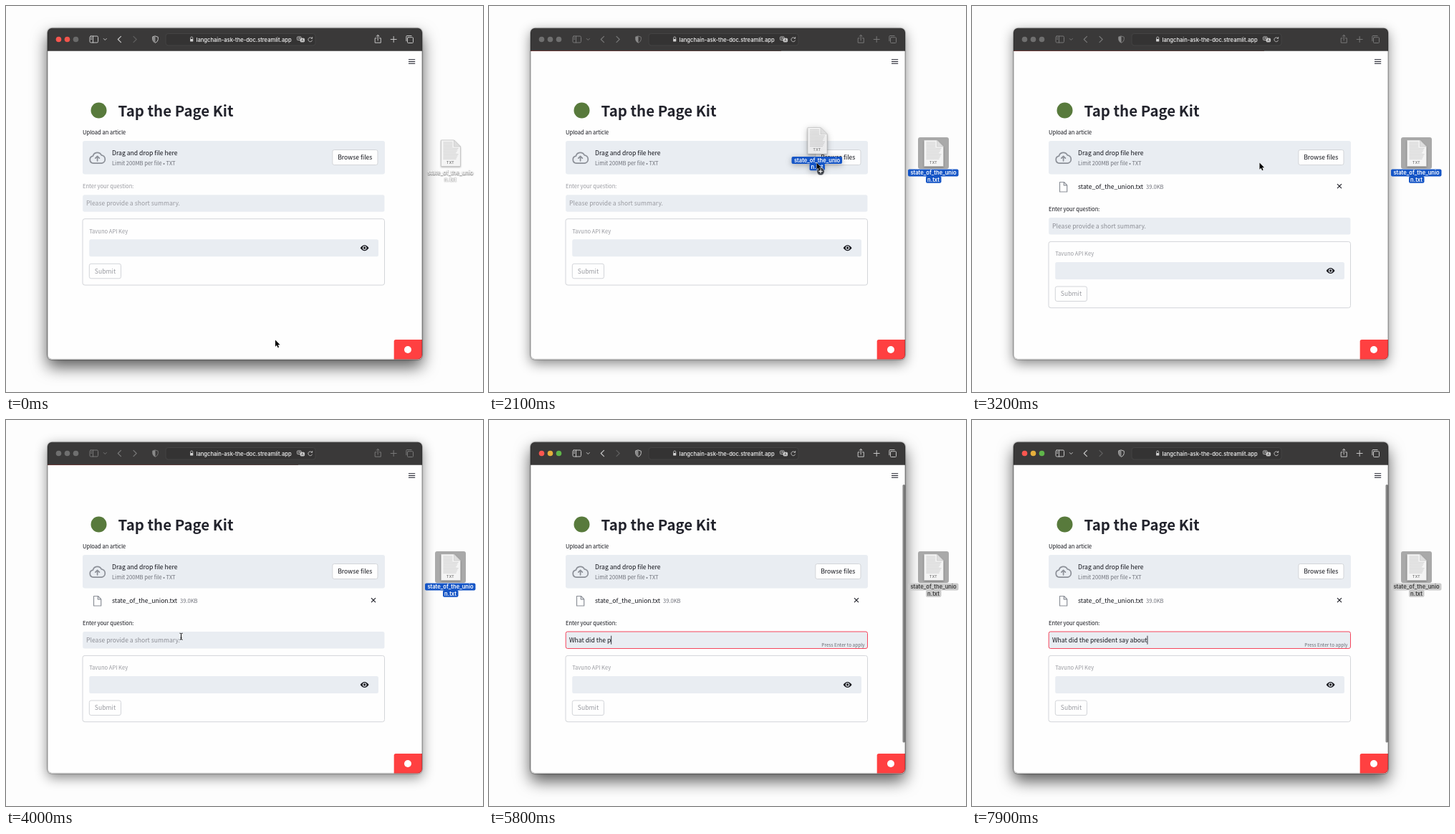
Recreate the animation shown at these times as an HTML page. Size 666 px wide and 538 px high, loop 8000 ms.

```html
<!DOCTYPE html>
<html lang="en">
<head>
<meta charset="utf-8">
<title>Document questions</title>
<style>
html, body { margin: 0; width: 100%; height: 100%; overflow: hidden; background: #fdfdfd; }
#win { position: absolute; left: 58px; top: 31px; width: 523px; height: 461.5px; border-radius: 6px;
  box-shadow: 0 5px 17px rgba(0,0,0,.48), 0 0 1.5px rgba(0,0,0,.8); }
.active #win { box-shadow: 0 10px 22px rgba(0,0,0,.66), 0 0 2px rgba(0,0,0,.8); }
svg { position: absolute; left: 0; top: 0; width: 666px; height: 538px; }
text { font: 8.65px "Noto Sans CJK JP", "Noto Sans CJK SC", "Noto Sans CJK", "Open Sans", sans-serif; fill: #12131a; white-space: pre; }
.small { font-size: 7.57px; }
.tiny { font-size: 6.5px; fill: #686a72; text-anchor: end; }
.soft { fill: #6f717a; }
.pale { fill: #999aa0; }
.title { font-size: 20.4px; font-weight: 700; fill: #22232c; }
.field { fill: #e9edf2; }
.edge { fill: #fefefe; stroke: #d3d5d9; }
.url { font: 500 7.6px Inter, "Liberation Sans", sans-serif; fill: #f4f4f4; }
.icons { fill: none; stroke: #777; stroke-linecap: round; stroke-linejoin: round; }
.active .icons { stroke: #c4c4c4; }
.active .next { stroke: #5f5f5f; }
.line { fill: none; stroke: #8c9098; stroke-width: 1.2; stroke-linejoin: round; stroke-linecap: round; }
.cloud { stroke-width: 1.7; }
.active #strip { display: none; }
.name text { font: 600 7.6px Inter, "Liberation Sans", sans-serif; text-anchor: middle; fill: #fff; }
.name rect { fill: #1555c6; }
.plain rect { fill: none; }
.plain text { text-shadow: 0 .5px 1.5px rgba(0,0,0,.75); }
.dim rect { fill: #cbcbcb; }
.dim text { fill: #3c3c3c; }
#ghost { filter: drop-shadow(0 2px 4px rgba(0,0,0,.3)); }
.focus #ask { stroke: #f5455c; }
.ready #prompt { fill: #12131a; }
.ready #hint { fill: #8b8d94; }
</style>
</head>
<body>
<div id="win"></div>
<svg viewBox="0 0 666 538">
  <defs>
    <g id="doc">
      <path d="M-13-18H5L14-9V18.500H-13Z" fill="#f4f4f4" stroke="#bdbdbd" stroke-width=".7" style="filter:drop-shadow(0 1px 1px rgba(0,0,0,.3))"/>
      <path id="lines" stroke="#c4c4c4" stroke-width=".8"/>
      <path d="M5-18V-9H14Z" fill="#dedede" stroke="#bdbdbd" stroke-width=".5"/>
      <text y="14.500" text-anchor="middle" style="font:500 5px Inter,sans-serif;letter-spacing:.4px;fill:#666">TXT</text>
    </g>
    <g id="label">
      <rect x="-35.500" y="22.500" width="70.500" height="10" rx="2"/>
      <rect x="-10.500" y="32" width="21.500" height="9.700" rx="2"/>
      <text y="30.200">state_of_the_unio</text>
      <text y="39.500">n.txt</text>
    </g>
    <linearGradient id="warm"><stop stop-color="#6a2421"/><stop offset="1" stop-color="#432f2c"/></linearGradient>
  </defs>

  <!-- window -->
  <rect x="58" y="31" width="523" height="461.500" rx="6" fill="#fefefe"/>
  <path d="M58 62.700V37a6 6 0 0 1 6-6H575a6 6 0 0 1 6 6V62.700Z" fill="#3a3939"/>
  <path d="M64 31.400H575" stroke="#5b5b5b" stroke-width=".8"/>
  <rect id="strip" x="58" y="62" width="350" height=".7" fill="url(#warm)"/>
  <g id="lights"><circle cx="73.500" cy="46.500" r="3.800"/><circle cx="85.500" cy="46.500" r="3.800"/><circle cx="97.500" cy="46.500" r="3.800"/></g>
  <rect x="223" y="38.500" width="209" height="16.500" rx="3.500" fill="#343333" stroke="#484848" stroke-width=".8"/>
  <g class="icons">
    <path d="M118.500 42h8.500a1.500 1.500 0 0 1 1.500 1.500v6a1.500 1.500 0 0 1-1.500 1.500h-8.500a1.500 1.500 0 0 1-1.500-1.500v-6a1.500 1.500 0 0 1 1.500-1.500ZM121.500 42v9M118.600 44.300h1.200M118.600 46.300h1.200"/>
    <path d="M136.300 45.500l2 2 2-2"/>
    <path d="M160.500 42.300l-4.200 4.200 4.200 4.200" stroke-width="1.200"/>
    <path class="next" d="M178 42.300l4.200 4.200-4.200 4.200" stroke-width="1.200"/>
    <path d="M208.500 42l3.800 1.300v3.200q0 3-3.800 4.900q-3.800-1.900-3.800-4.900v-3.200Z"/>
    <path d="M208.500 42v9.400q-3.800-1.900-3.800-4.900v-3.200Z" fill="#8a8a8a" stroke="none"/>
    <path d="M517 44.800h-1.800v6.400h8.100v-6.400h-1.800M519.200 48v-7.500M517.200 42.300l2-2 2 2"/>
    <path d="M541.200 42.500v8M537.200 46.500h8"/>
    <path d="M561.500 43.700h6a1 1 0 0 1 1 1v5.800a1 1 0 0 1-1 1h-6a1 1 0 0 1-1-1v-5.800a1 1 0 0 1 1-1ZM558.900 48.700v-6.200a1 1 0 0 1 1-1h6.200"/>
  </g>
  <g fill="none" stroke="#d2d2d2" stroke-width=".8">
    <path d="M257.600 46v-1.400a1.600 1.600 0 0 1 3.200 0v1.400"/>
    <rect x="257.100" y="46" width="4.200" height="3.600" fill="#d2d2d2" stroke="none" rx=".6"/>
    <rect x="406.500" y="42.800" width="5.600" height="4.800" rx="1"/>
    <rect x="411" y="45.200" width="5.600" height="4.800" rx="1" fill="#d2d2d2"/>
    <path d="M408 44.600h2.600M409.300 44v.6M408.100 46.600l2-2"/>
    <path d="M412.500 49.200l1.300-2.800 1.300 2.800" stroke="#343333" stroke-width=".7"/>
    <path d="M427.400 45.500a2.900 2.900 0 1 0 .2 2.100M425.700 45.200h2v-2.200"/>
  </g>
  <text class="url" x="265.500" y="49.500">langchain-ask-the-doc.streamlit.app</text>

  <!-- page -->
  <path d="M562 74.500h9.200M562 77.300h9.200M562 80.100h9.200" stroke="#3a3b45" stroke-width="1.200"/>
  <circle cx="129.500" cy="145.500" r="11" fill="#587a3c"/>
  <text class="title" x="156.500" y="153.700">Tap the Page Kit</text>
  <text class="small" x="107" y="178.500">Upload an article</text>
  <rect class="field" x="107" y="188" width="422" height="46.500" rx="3"/>
  <path class="line cloud" d="M122 219.200a5.100 5.100 0 0 1-.6-10.100a6.300 6.300 0 0 1 11.800-1.200a5.700 5.700 0 0 1 .3 11.300ZM127.600 215.800v-6M124.800 212.200l2.800-2.800 2.800 2.800"/>
  <text x="148" y="208">Drag and drop file here</text>
  <text class="small soft" x="148" y="222.300">Limit 200MB per file • TXT</text>
  <rect class="edge" x="455.800" y="200.500" width="63.200" height="21" rx="2.500"/>
  <text x="487.300" y="214.300" text-anchor="middle">Browse files</text>

  <g id="upload">
    <path class="line" d="M122.500 245.500h6l4.200 4.200v9.300h-10.200ZM128.300 245.700v4.200h4.200"/>
    <text x="148" y="255">state_of_the_union.txt</text>
    <text class="small soft" x="243" y="255">39.0KB</text>
    <path d="M510 248.200l6 6M516 248.200l-6 6" stroke="#22232c" stroke-width="1.200"/>
  </g>

  <g id="low">
    <text id="prompt" class="small pale" x="107" y="254.200">Enter your question:</text>
    <rect id="ask" class="field" x="107.200" y="263.300" width="421.300" height="23.500" rx="2.500"/>
    <text id="hint" class="pale" x="112" y="278.400">Please provide a short summary.</text>
    <text id="typed" x="112" y="278.400"></text>
    <rect id="caret" y="269" width=".9" height="12" fill="#22232c"/>
    <text id="apply" class="tiny" x="524.500" y="284.200">Press Enter to apply</text>
    <rect class="edge" x="107" y="296.700" width="421.500" height="92.300" rx="3"/>
    <text class="small pale" x="116.200" y="316.500">Tavuno API Key</text>
    <rect class="field" x="116.200" y="325.200" width="403.800" height="24" rx="2.500"/>
    <path d="M494.600 337.200q6-8 12 0q-6 8-12 0Z" fill="#17181f"/>
    <circle cx="500.600" cy="337.200" r="2.200" fill="#17181f" stroke="#e9edf2" stroke-width="1.100"/>
    <rect class="edge" x="116.300" y="359.300" width="44.200" height="20.500" rx="2.500"/>
    <text class="pale" x="138.500" y="372.700" text-anchor="middle">Submit</text>
  </g>
  <rect id="scroll" x="577.500" y="90" width="3.500" height="359.500" rx="1.500" fill="#858585"/>
  <path d="M541.700 492.500V467.500a2.500 2.500 0 0 1 2.500-2.500H581V486.500a6 6 0 0 1-6 6Z" fill="#ff4041"/>
  <circle cx="561" cy="479" r="5" fill="#fff"/>
  <rect x="58.200" y="31.200" width="522.600" height="461.100" rx="6" fill="none" stroke="#000" stroke-opacity=".4" stroke-width=".7"/>

  <!-- desktop file, dragged copy, pointer -->
  <g transform="translate(620.500 205)">
    <rect id="picked" x="-21.500" y="-22" width="43" height="44" rx="3" fill="#a9a9a9"/>
    <use href="#doc"/>
    <g id="name" class="name"></g>
  </g>
  <g id="ghost">
    <use href="#doc" opacity=".85"/>
    <g class="name" id="ghostName"></g>
  </g>
  <g id="pointer">
    <g id="badge"><circle cx="5.500" cy="12" r="5.200" fill="#3d4148" stroke="#d8dbe0" stroke-width=".6"/><path d="M2.800 12h5.400M5.500 9.300v5.400" stroke="#fff" stroke-width="1.200"/></g>
    <path id="arrow" d="M0 0V9.200L2.100 7.200L3.600 10.700L5.100 10L3.600 6.700H6.600Z" stroke="#fff" stroke-width=".7" paint-order="stroke"/>
    <path id="beam" d="M-2-4.500q2 0 2 1.200q0-1.200 2-1.200M0-3.300v6.600M-2 4.500q2 0 2-1.200q0 1.200 2 1.200M-1 1.500h2" fill="none" stroke="#111"/>
  </g>
</svg>
<script>
const $ = id => document.getElementById(id);
const LOOP = 8000, GRAB = 1000, DRAG = 1300, DROP = 2750, ADDED = 2900, CLICK = 4200;
const QUESTION = "What did the president say about";

$("lines").setAttribute("d", Array.from({length: 12}, (_, i) =>
  `M-10 ${-15 + i * 2.1}h${i < 4 ? 13 : 21 - i * 5 % 4}`).join(""));
// cloned so that each label takes the colours of its own group
for (const id of ["name", "ghostName"]) {
  const copy = $("label").cloneNode(true);
  copy.removeAttribute("id");
  $(id).append(copy);
}

const ease = (t, a, b) => {
  const u = Math.min(1, Math.max(0, (t - a) / (b - a)));
  return u * u * (3 - 2 * u);
};
const show = (id, on) => $(id).style.display = on ? "" : "none";
const move = (id, x, y) => $(id).setAttribute("transform", `translate(${x} ${y})`);

// [start, end, x, y]: each leg leads to the next resting place
const legs = [[150, 950, 618.5, 218.5], [DRAG, 2500, 401.5, 218.5], [3400, 4100, 235.5, 306.5]];
function pointerAt(t) {
  let x = 376, y = 465.5;
  for (const [a, b, X, Y] of legs) {
    const u = ease(t, a, b);
    x += (X - x) * u;
    y += (Y - y) * u;
  }
  return [x, y];
}

function typedCount(t) {
  return t < 6000 ? Math.max(0, Math.min(15, Math.round((t - 4800) * .014)))
                  : 15 + Math.round((t - 6000) / 1900 * 17);
}

function lightColors(t, active) {
  if (!active) return ["#6f6f6f", "#6f6f6f", "#6f6f6f"];
  if (t < GRAB) return ["#f9564f", "#f0544b", "#6a6a6a"];
  return ["#f9564f", "#e5ae3c", t < 4900 ? "#6f7a6c" : "#5fb54a"];
}

function draw(t) {
  const active = t < GRAB || t >= CLICK, added = t >= ADDED, focus = t >= CLICK;
  const [x, y] = pointerAt(t), dragging = t > DRAG && t < DROP;
  const n = Math.min(QUESTION.length, typedCount(t));

  document.body.className = [active && "active", added && "ready", focus && "focus"].filter(Boolean).join(" ");
  const colors = lightColors(t, active);
  [...$("lights").children].forEach((c, i) => c.setAttribute("fill", colors[i]));

  show("picked", t >= GRAB);
  $("name").setAttribute("class", "name " + (t < GRAB ? "plain" : focus ? "dim" : ""));
  show("ghost", dragging);
  move("ghost", x + .5, y - 13.5 - 17.5 * ease(t, DRAG, DRAG + 300));

  show("upload", added);
  move("low", 0, added ? 31.7 : 0);
  show("scroll", focus);
  show("hint", !n);
  show("apply", n);
  show("caret", focus);
  $("typed").textContent = QUESTION.slice(0, n);
  $("caret").setAttribute("x", 112 + (n ? $("typed").getComputedTextLength() : 0));

  const beam = t > 3400 && y > 295;
  show("pointer", !n);
  show("arrow", !beam);
  show("beam", beam);
  show("badge", dragging && x < 581);
  move("pointer", x, y);
}

function tick(now) {
  draw(now % LOOP);
  requestAnimationFrame(tick);
}
draw(0);
requestAnimationFrame(tick);
</script>
</body>
</html>
```
